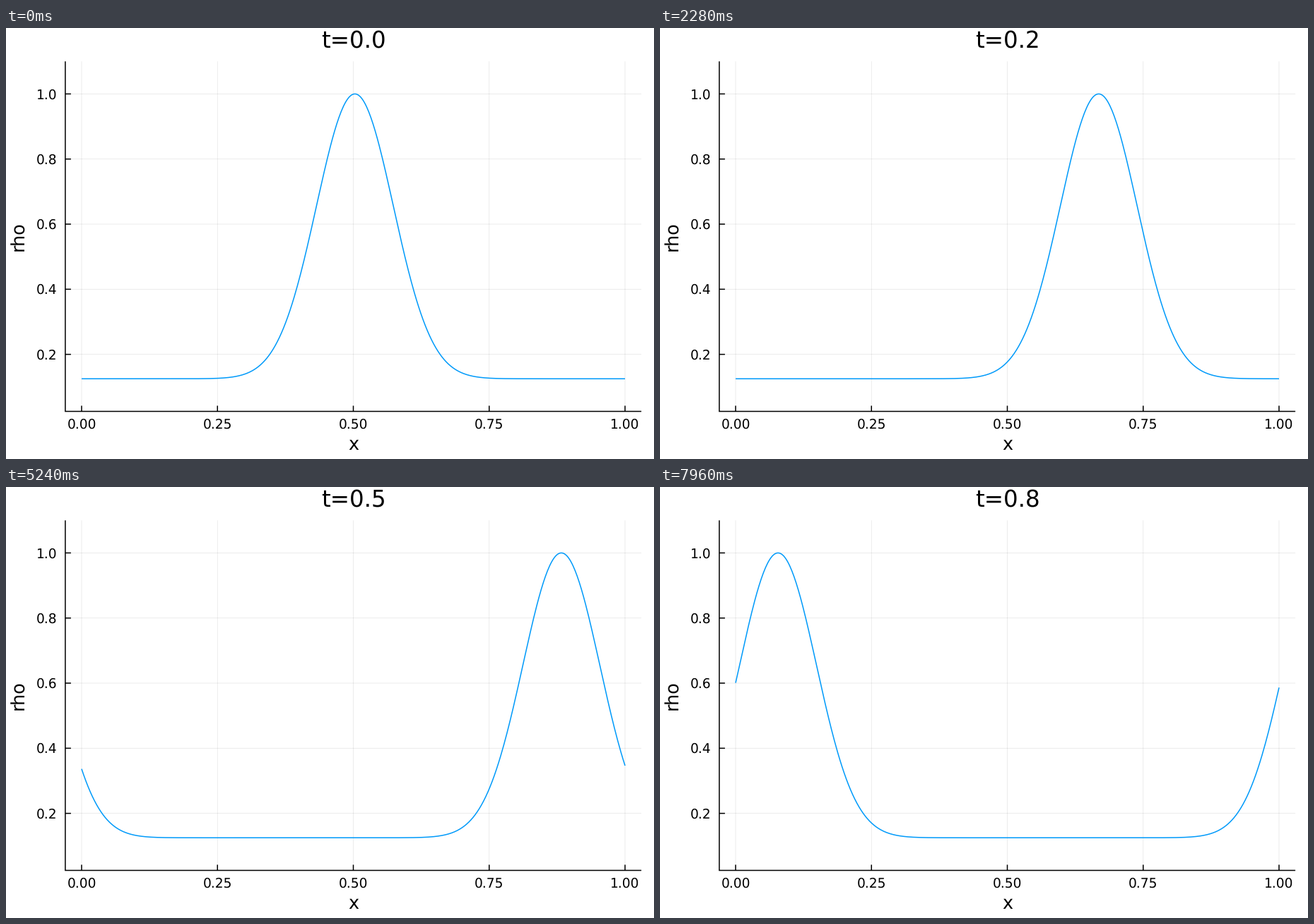
Recreate the animation shown at these times as a matplotlib script. Size 917x611 px, loop 8000 ms.

```python
import numpy as np
import matplotlib.pyplot as plt
from matplotlib.animation import FuncAnimation

W, H, DPI = 917, 611, 64
PX = 72 / DPI                      # points per pixel
LEFT, RIGHT, TOP, BOTTOM = 83.9, 899.1, 47.3, 543.5
FRAMES, STEP_MS = 200, 40
SPEED = 0.7
DT = 0.58 / FRAMES / SPEED
CELLS = 512
PERIOD = CELLS / (CELLS - 1)

plt.rcParams.update({
    "font.family": "DejaVu Sans",
    "text.hinting": "none",
    "path.snap": False,
})

fig = plt.figure(figsize=(W / DPI, H / DPI), dpi=DPI, facecolor="white")
ax = fig.add_axes([0, 0, 1, 1])
ax.set(xlim=(0, W), ylim=(H, 0))
ax.axis("off")


def px(x):
    return 107 + 769 * x


def py(rho):
    return 93.45 + 461.5 * (1 - rho)


def stroke(xs, ys, width=1.53, color="black", **kw):
    return ax.plot(xs, ys, color=color, lw=width * PX,
                   solid_capstyle="butt", **kw)[0]


def label(x, y, text, size, ha="center", **kw):
    return ax.text(x, y, text, fontsize=size * PX, ha=ha, va="baseline", **kw)


def density(x, t):
    d = x - 0.5 - SPEED * t
    d -= PERIOD * np.round(d / PERIOD)
    return 0.125 + 0.875 * np.exp(-d**2 / 0.01)


grid = dict(width=0.76, alpha=0.1)
for v in np.linspace(0, 1, 5):
    stroke([px(v)] * 2, [TOP, BOTTOM], **grid)
    stroke([px(v)] * 2, [BOTTOM, BOTTOM - 8], zorder=3)
    label(px(v), 567.7, f"{v:.2f}", 18.6)
for v in np.linspace(0.2, 1, 5):
    stroke([LEFT, RIGHT], [py(v)] * 2, **grid)
    stroke([LEFT, LEFT + 8], [py(v)] * 2, zorder=3)
    label(72.2, py(v) + 6.8, f"{v:.1f}", 18.6, ha="right")

stroke([LEFT, LEFT, RIGHT], [TOP, BOTTOM, BOTTOM], zorder=3,
       solid_joinstyle="miter")
label(491.5, 598, "x", 25.5)
label(25, 295.6, "rho", 25.5, rotation=90, rotation_mode="anchor")

title = label(491.7, 28, "", 32.5)
x = np.linspace(0, 1, CELLS)
curve = stroke(px(x), py(density(x, 0)), color="#009AFA", zorder=4,
               solid_joinstyle="round")


def update(i):
    t = (i + 1) * DT
    curve.set_ydata(py(density(x, t)))
    title.set_text(f"t={t:.1f}")
    return curve, title


anim = FuncAnimation(fig, update, frames=FRAMES, interval=STEP_MS,
                     repeat=True, repeat_delay=0)
plt.show()
```
